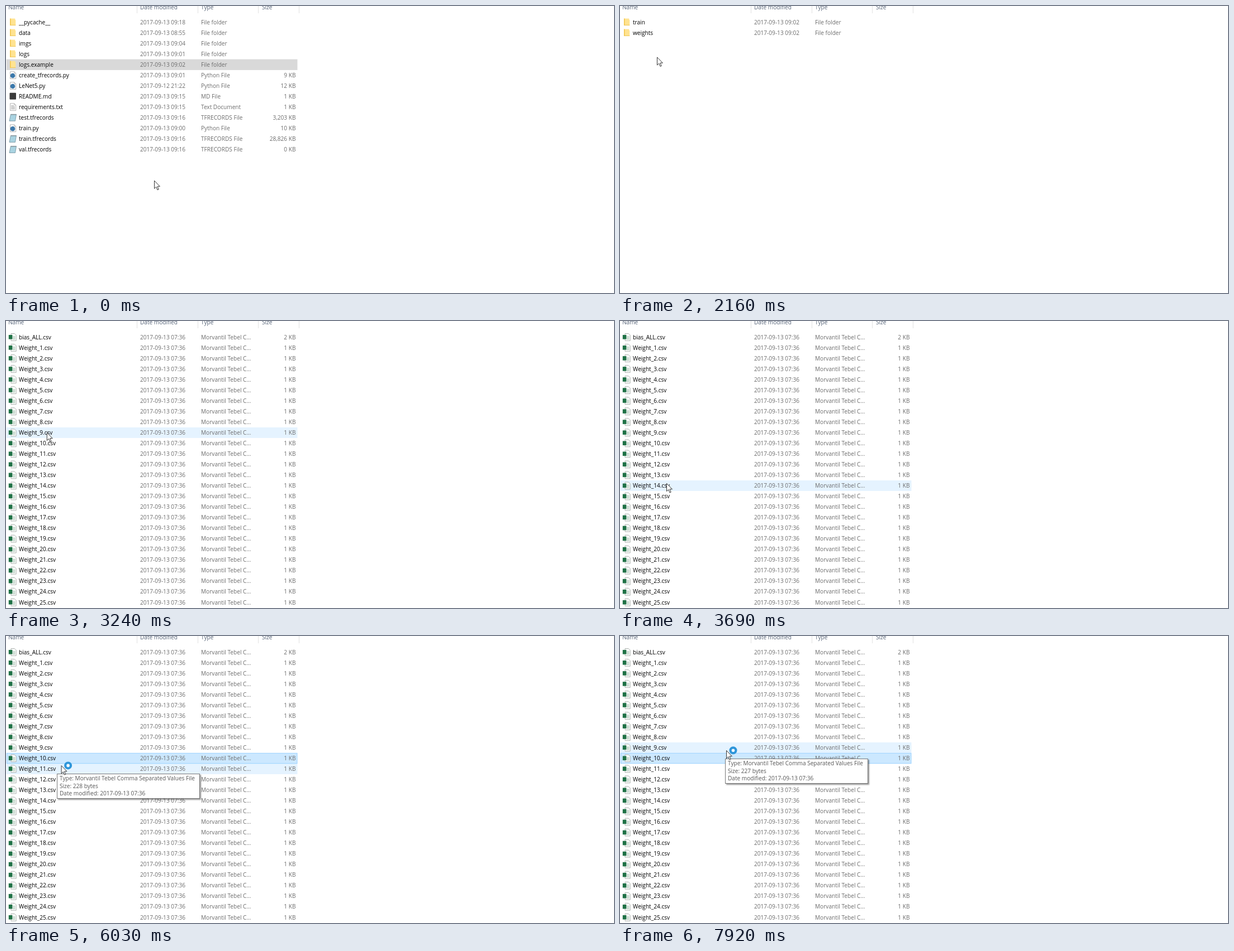
Recreate the animation shown at these times as an HTML page. Size 1088 by 515 pixels, loop 8000 ms.

```html
<!DOCTYPE html>
<html lang="en">
<head>
<meta charset="utf-8">
<title>File list</title>
<style>
  html, body { margin: 0; width: 100%; height: 100%; overflow: hidden; background: #fff; }
  svg { display: block; width: 100%; height: 100%; }
  text { font: 10.1px "Open Sans", "Noto Sans", sans-serif; fill: #6d6d6d; white-space: pre; }
  .name { fill: #000; }
  .head { fill: #59667a; }
  .size { text-anchor: end; }
  #tip { filter: drop-shadow(2px 2px 1px rgba(0, 0, 0, .4)); }
  #tip text { fill: #575757; }
</style>
</head>
<body>
<svg id="stage" viewBox="0 0 1088 515">
  <defs>
    <g id="folder">
      <path d="M7 22.5h9.3v2.3h1v10.2H7z" fill="#ffe391"/>
      <path d="M7 22.5h1.6v12.5H7z" fill="#f3c74f"/>
      <path d="M7 34.4h10.3" stroke="#efc85c"/>
    </g>
    <g id="page">
      <path d="M7.5 22.5h7.2l3 3v9.8H7.5z" fill="#fff" stroke="#a3a3a3" stroke-width=".8"/>
      <path d="M14.7 22.5v3h3" fill="none" stroke="#a3a3a3" stroke-width=".7"/>
    </g>
    <g id="py">
      <use href="#page"/>
      <circle cx="12" cy="29.8" r="4.3" fill="#3c78aa"/>
    </g>
    <g id="md"><rect x="6.5" y="22.5" width="11.5" height="12" rx="1" fill="#3b3b3b"/></g>
    <g id="txt">
      <use href="#page"/>
      <path d="M9 26.5h5M9 28.5h7M9 30.5h7M9 32.5h7" stroke="#8d8d8d" stroke-width=".8"/>
    </g>
    <g id="pad">
      <path d="M8.5 23h10l-2 12H6z" fill="#a9d3e1" stroke="#6f8f9c" stroke-width=".8"/>
      <path d="M8.6 23.4h9.6" stroke="#8a9499" stroke-width="1.4"/>
    </g>
    <g id="csv">
      <path d="M9 22.5h6.2l3 3v9.8H9z" fill="#fff" stroke="#969d98" stroke-width=".8"/>
      <path d="M12 28h4.5M12 30.2h4.5M12 32.4h4.5" stroke="#79a68b" stroke-width=".8"/>
      <rect x="4.8" y="25" width="6.6" height="7.6" fill="#1e7145"/>
    </g>
  </defs>
  <rect width="1088" height="515" fill="#fff"/>
  <rect id="hover" x="1" width="520.5" height="19" fill="#e5f3ff"/>
  <rect id="select" x="1.5" width="519.5" height="18.4"/>
  <g id="head"></g>
  <g id="lists"></g>
  <g id="tip">
    <rect x=".5" y=".5" width="255" height="44" fill="#fff" stroke="#767676"/>
    <text x="5" y="12.4"></text>
    <text x="5" y="25.8"></text>
    <text x="5" y="39.2"></text>
  </g>
  <g id="cursor">
    <path d="M.5 .5V14.6L3.8 11.6 6 17 8.2 16.1 6 10.8H10.4Z" fill="#fff" stroke="#2b2b2b" stroke-width=".95"/>
    <circle id="busy" cx="12.5" cy=".3" r="4.9" fill="#f4fbff" stroke="#2f96da" stroke-width="4.2"/>
  </g>
</svg>
<script>
const LOOP = 8000, STEP = 90, TOP = 19.5, ROW = 19.04;
const $ = id => document.getElementById(id);
const APP = 'Morvantil Tebel';

function add(parent, tag, attrs, content = '') {
  const el = document.createElementNS('http://www.w3.org/2000/svg', tag);
  for (const key in attrs) el.setAttribute(key, attrs[key]);
  el.textContent = content;
  parent.append(el);
  return el;
}

const label = (parent, x, y, content, cls = '') =>
  add(parent, 'text', { x, y, class: cls }, content);

const types = {
  folder: 'File folder', py: 'Python File', md: 'MD File', txt: 'Text Document',
  pad: 'TFRECORDS File', csv: APP + ' C...'
};

const project = [
  ['folder', '__pycache__', '13 09:18'],
  ['folder', 'data', '13 08:55'],
  ['folder', 'imgs', '13 09:04'],
  ['folder', 'logs', '13 09:01'],
  ['folder', 'logs.example', '13 09:02'],
  ['py', 'create_tfrecords.py', '13 09:01', '9'],
  ['py', 'LeNet5.py', '12 21:22', '12'],
  ['md', 'README.md', '13 09:15', '1'],
  ['txt', 'requirements.txt', '13 09:15', '1'],
  ['pad', 'test.tfrecords', '13 09:16', '3,203'],
  ['py', 'train.py', '13 09:00', '10'],
  ['pad', 'train.tfrecords', '13 09:16', '28,826'],
  ['pad', 'val.tfrecords', '13 09:16', '0']
];
const logs = ['train', 'weights'].map(name => ['folder', name, '13 09:02']);
const weights = Array.from({ length: 26 }, (_, i) =>
  ['csv', i ? `Weight_${i}.csv` : 'bias_ALL.csv', '13 07:36', i ? '1' : '2']);

function buildList(files) {
  const g = add($('lists'), 'g');
  files.forEach(([icon, name, date, size], i) => {
    const y = 32.5 + i * ROW;
    add(g, 'use', { href: '#' + icon, y: i * ROW });
    label(g, 23, y, name, 'name');
    label(g, 240, y, '2017-09-' + date);
    label(g, 349, y, types[icon]);
    if (size) label(g, 518.5, y, size + ' KB', 'size');
  });
  return { g, count: files.length };
}
const lists = [project, logs, weights].map(buildList);

[[4, 'Name'], [240, 'Date modified'], [349, 'Type'], [458, 'Size']].forEach(([x, name]) =>
  label($('head'), x, 6.3, name, 'head'));
for (const x of [234.5, 343.5, 451.5, 524.5])
  add($('head'), 'path', { d: `M${x} 0V13`, stroke: '#e2e2e2' });

// Pointer path: time, x, y
const path = [
  [180, 265, 313], [990, 65, 109],
  [1710, 65, 109], [1890, 68, 117], [2520, 63, 52],
  [2790, 63, 52], [2880, 63, 62], [2970, 63, 66], [3600, 88, 406],
  [3690, 83, 291], [3780, 75, 236], [3870, 68, 206], [4140, 62, 212],
  [4680, 62, 212], [4950, 80, 219],
  [5220, 80, 219], [5400, 93, 232],
  [5940, 93, 232], [6480, 168, 233], [6660, 186, 207], [6840, 182, 198],
  [7200, 182, 198], [7560, 190, 205]
];

function pointer(t) {
  const i = path.findIndex(p => p[0] > t);
  if (i < 0) return path[path.length - 1].slice(1);
  if (i === 0) return path[0].slice(1);
  const a = path[i - 1], b = path[i];
  let k = (t - a[0]) / (b[0] - a[0]);
  k = k * k * (3 - 2 * k);
  return [a[1] + (b[1] - a[1]) * k, a[2] + (b[2] - a[2]) * k];
}

// Last entry that has started
const at = (keys, t) => keys.filter(k => k[0] <= t).pop()[1];
const ramp = (t, from, to) => Math.min(1, Math.max(0, (t - from) / (to - from)));

const views = [[0, 0], [1530, -1], [1620, 1], [2700, -1], [2880, 2]];
const picks = [[0, 4], [1530, -1], [2520, 1], [2700, -1], [4140, 10]];

function placeRow(el, row) {
  el.style.display = row < 0 ? 'none' : '';
  el.setAttribute('y', TOP + row * ROW + (el.id === 'select' ? .4 : 0));
}

function showTip(t) {
  const second = t >= 7000;
  const alpha = second
    ? ramp(t, 7560, 7920)
    : ramp(t, 5400, 5670) * (1 - ramp(t, 6480, 6790));
  const lines = [
    `Type: ${APP} Comma Separated Values File`,
    `Size: ${second ? 227 : 228} bytes`,
    'Date modified: 2017-09-13 07:36'
  ];
  $('tip').querySelectorAll('text').forEach((el, i) => { el.textContent = lines[i]; });
  $('tip').setAttribute('transform', second ? 'translate(188 220)' : 'translate(91 247)');
  $('tip').style.opacity = alpha;
}

function draw(time) {
  const t = Math.floor(time % LOOP / STEP) * STEP;
  const [x, y] = pointer(t), view = at(views, t), pick = at(picks, t);
  lists.forEach(({ g }, i) => { g.style.display = i === view ? '' : 'none'; });

  const row = Math.floor((y - TOP) / ROW);
  const inside = view >= 0 && row >= 0 && row < lists[view].count;
  placeRow($('hover'), inside ? row : -1);
  placeRow($('select'), pick);
  const active = t >= 990;
  $('select').setAttribute('fill', active ? '#cce8ff' : '#d9d9d9');
  $('select').setAttribute('stroke', active ? '#99d1ff' : '#d9d9d9');

  showTip(t);
  $('cursor').setAttribute('transform', `translate(${x.toFixed(1)} ${y.toFixed(1)})`);
  $('busy').style.display = t >= 4590 ? '' : 'none';
}

const start = performance.now();
function tick() {
  draw(performance.now() - start);
  requestAnimationFrame(tick);
}
tick();
</script>
</body>
</html>
```
